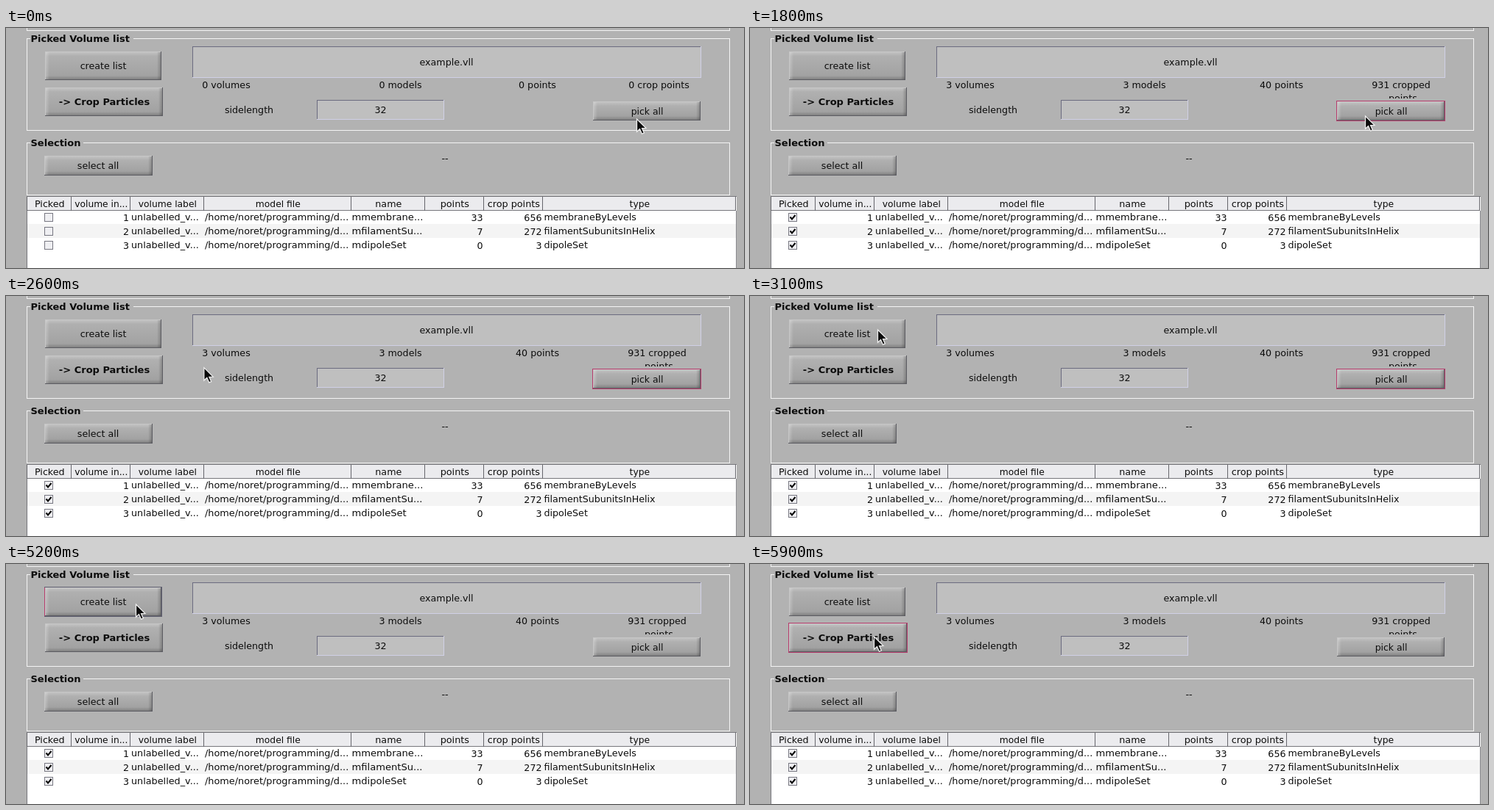
An HTML page with a canvas for the animation above (7.5 s loop, 1002x327 px).

```html
<!DOCTYPE html>
<html lang="en">
<head>
<meta charset="utf-8">
<title>Volume picking</title>
<style>
html, body { margin: 0; width: 1002px; height: 327px; overflow: hidden; background: #b2b2b2; }
canvas { display: block; }
</style>
</head>
<body>
<canvas id="stage" width="1002" height="327"></canvas>
<script>
const ctx = document.getElementById('stage').getContext('2d');
const LOOP = 7500, STEP = 100;
const PINK = '#b73c6c';

// Pointer tip: time, x, y
const path = [
  [0, 856, 123], [100, 857, 120], [200, 858, 117],
  [1700, 858, 117], [1800, 835, 119], [1900, 770, 124], [2200, 493, 144],
  [2500, 300, 113], [2800, 205, 64], [3100, 173, 45],
  [5100, 173, 45], [5200, 176, 54], [5600, 168, 98], [LOOP, 168, 98]
];

const columns = [28, 88, 168, 268, 468, 568, 648, 728, 990];
const headers = [
  ['Picked', 12.7], ['volume in...', 12.25], ['volume label', 12.3], ['model file', 12.3],
  ['name', 12.7], ['points', 12.8], ['crop points', 12.8], ['type', 12.3]
];
const rows = [
  ['mmembrane...', 33, 656, 'membraneByLevels'],
  ['mfilamentSu...', 7, 272, 'filamentSubunitsInHelix'],
  ['mdipoleSet', 0, 3, 'dipoleSet']
];

function rect(x, y, w, h, color) {
  ctx.fillStyle = color;
  ctx.fillRect(x, y, w, h);
}

function outline(x, y, w, h, color) {
  ctx.strokeStyle = color;
  ctx.lineWidth = 1;
  ctx.strokeRect(x + 0.5, y + 0.5, w - 1, h - 1);
}

function bevel(x, y, w, h, light, dark) {
  rect(x, y, w, 1, light);
  rect(x, y, 1, h, light);
  rect(x, y + h - 1, w, 1, dark);
  rect(x + w - 1, y, 1, h, dark);
}

function text(s, x, y, align = 'center', size = 12.65, weight = 'normal') {
  ctx.font = `${weight} ${size}px "DejaVu Sans", sans-serif`;
  ctx.textAlign = align;
  ctx.fillStyle = '#0c0c0c';
  ctx.fillText(s, x, y);
}

function shade(x, y, w, h, horizontal, ...stops) {
  const g = ctx.createLinearGradient(x, y, horizontal ? x + w : x, horizontal ? y : y + h);
  stops.forEach(([at, color]) => g.addColorStop(at, color));
  rect(x, y, w, h, g);
}

function button(x, y, w, h, pressed) {
  if (pressed) {
    rect(x, y, w, h, '#a3a3a3');
    bevel(x, y, w, h, '#66666c', '#77777f');
    return;
  }
  const edge = 6 / h;
  shade(x, y, w, h, false, [0, '#c6c6c6'], [edge, '#b0b0b0'], [1 - edge, '#a2a2a2'], [1, '#7a7a7a']);
  shade(x, y, 6, h, true, [0, 'rgba(255,255,255,.3)'], [1, 'rgba(255,255,255,0)']);
  shade(x + w - 6, y, 6, h, true, [0, 'rgba(0,0,0,0)'], [1, 'rgba(0,0,0,.25)']);
  bevel(x, y, w, h, '#c6c6c6', '#5c5c62');
}

function field(x, y, w, h) {
  rect(x, y, w, h, '#bfbfbf');
  bevel(x, y, w, h, '#6b6b80', '#d0d0e6');
}

function group(y, h, title, gap) {
  outline(28, y, 955, h, '#f4f4f4');
  if (!title) return;
  rect(33, y, gap, 1, '#b2b2b2');
  text(title, 33.5, y + 5, 'left', 13, 'bold');
}

function checkbox(y, checked) {
  rect(52, y, 12, 12, '#efeff2');
  outline(52, y, 12, 12, '#777781');
  if (!checked) return;
  ctx.strokeStyle = '#000';
  ctx.lineWidth = 2;
  ctx.beginPath();
  ctx.moveTo(54.5, y + 5.5);
  ctx.lineTo(57, y + 8.5);
  ctx.lineTo(61.5, y + 3);
  ctx.stroke();
}

function table(checked) {
  rect(28, 229, 964, 98, '#fff');
  rect(28, 230, 962, 19, '#ebebee');
  rect(28, 267, 963, 19, '#f4f4f4');
  rect(28, 229, 964, 1, '#77777c');
  rect(28, 248, 963, 1, '#77777c');
  rect(28, 229, 1, 98, '#77777c');
  rect(990, 230, 1, 19, '#66666c');
  rect(991, 249, 1, 78, '#8c8c90');
  headers.forEach(([label, size], i) => {
    rect(columns[i], 230, 1, 19, '#66666c');
    text(label, (columns[i] + columns[i + 1]) / 2 + 1.3, 244, 'center', size);
  });
  rows.forEach(([name, points, crops, type], i) => {
    const y = 262 + 19 * i;
    checkbox(y - 10, checked);
    text(i + 1, 167, y + 1, 'right');
    text('unlabelled_v...', 170, y, 'left', 12.8);
    text('/home/noret/programming/d...', 270, y, 'left', 12.85);
    text(name, 469.5, y, 'left', 13.1);
    text(points, 647.5, y + 1, 'right');
    text(crops, 727.5, y + 1, 'right');
    text(type, 730.5, y, 'left');
  });
}

function counters(picked) {
  text(picked ? '3 volumes' : '0 volumes', 299, 82);
  text(picked ? '3 models' : '0 models', 535.5, 82);
  text(picked ? '40 points' : '0 points', 721.5, 82);
  if (!picked) return text('0 crop points', 886.5, 82);
  text('931 cropped', 884, 82);
  ctx.save();
  ctx.beginPath();
  ctx.rect(840, 86, 90, 10);
  ctx.clip();
  text('points', 886.5, 100);
  ctx.restore();
}

function pointer(t) {
  const i = Math.max(1, path.findIndex(p => p[0] >= t));
  const [t0, x0, y0] = path[i - 1], [t1, x1, y1] = path[i];
  const k = (t - t0) / (t1 - t0);
  ctx.save();
  ctx.translate(x0 + (x1 - x0) * k + 0.5, y0 + (y1 - y0) * k + 1);
  ctx.scale(1.05, 1.05);
  ctx.beginPath();
  [[0, 0], [0, 16.5], [3.8, 13], [6.6, 19.3], [9.4, 18], [6.7, 12], [11.8, 11.8]]
    .forEach(p => ctx.lineTo(...p));
  ctx.closePath();
  ctx.fillStyle = '#0a0a0a';
  ctx.fill();
  ctx.strokeStyle = '#f0f0f0';
  ctx.lineWidth = 1.2;
  ctx.stroke();
  ctx.restore();
}

function draw(t) {
  const picked = t >= 900;
  rect(0, 0, 1002, 327, '#b2b2b2');
  group(-20, 24);
  group(14, 126, 'Picked Volume list', 140);
  group(156, 72, 'Selection', 72);

  button(53, 32, 158, 39, t >= 3900 && t < 4000);
  button(53, 81, 160, 39, t >= 5800 && t < 5900);
  button(797, 100, 146, 26);
  button(52, 174, 147, 27);
  if (picked && t < 3900) outline(796, 99, 148, 28, PINK);
  if (t >= 3900 && t < 5800) {
    outline(52, 31, 160, 41, '#5f5f70');
    rect(52, 32, 1, 39, PINK);
  }
  if (t >= 5800) outline(52, 80, 162, 41, PINK);
  text('create list', 132, 56);
  text('-> Crop Particles', 133.5, 105, 'center', 13, 'bold');
  text('pick all', 870.5, 118, 'center', 12.4);
  text('select all', 125, 192);

  field(253, 25, 691, 43);
  field(422, 98, 173, 27);
  text('example.vll', 598, 51);
  text('sidelength', 330, 116);
  text('32', 508.5, 116);
  text('--', 596, 182);
  counters(picked);
  table(t >= 1000);
  pointer(t);
}

function frame(now) {
  draw(Math.floor(now % LOOP / STEP) * STEP);
  requestAnimationFrame(frame);
}
frame(0);
</script>
</body>
</html>
```
